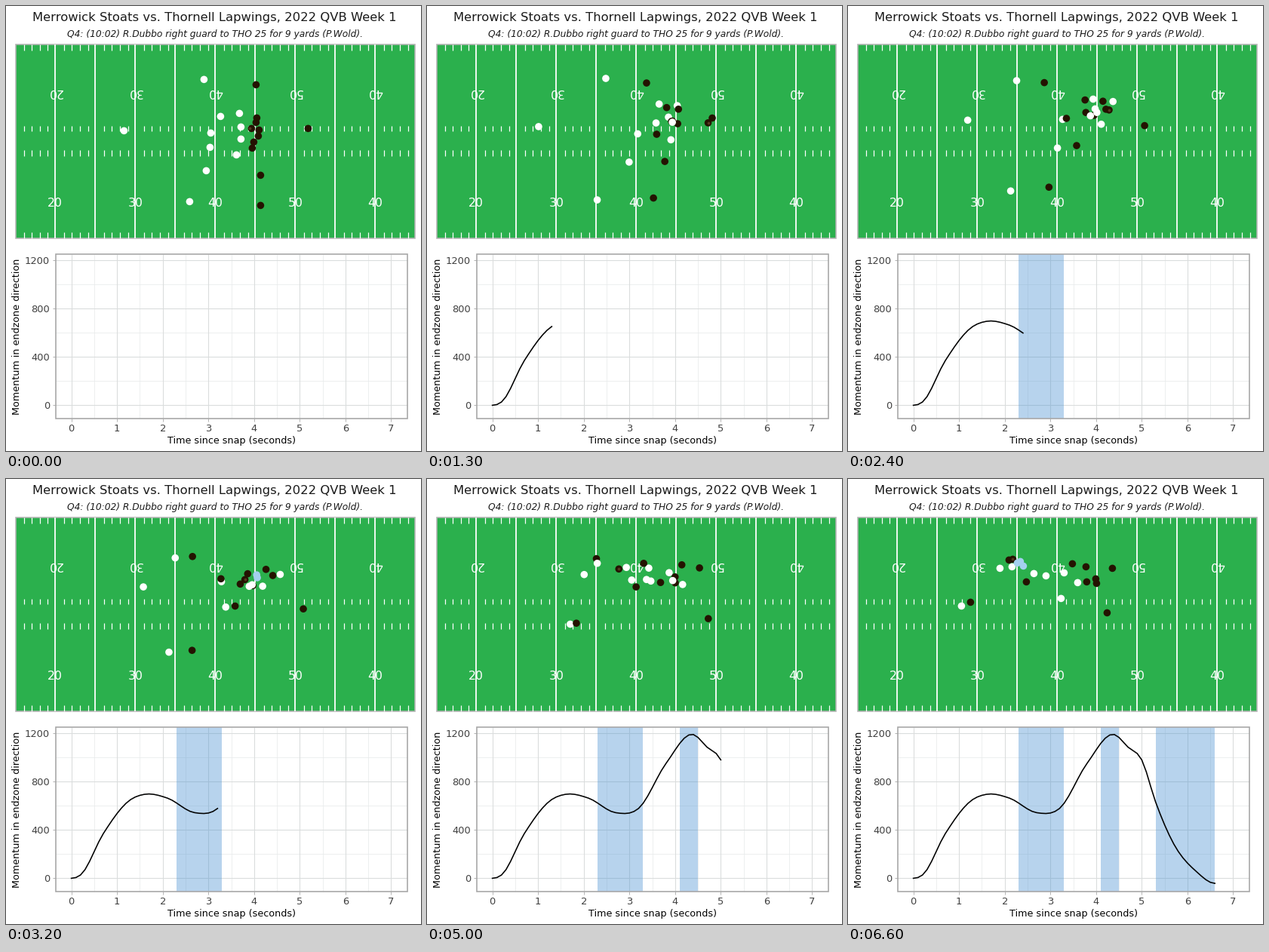
Animation of 550 by 590 pixels, one loop 7200 ms. Source, as a matplotlib script:

```python
import numpy as np
import matplotlib.pyplot as plt
from matplotlib.animation import FuncAnimation
from matplotlib.patches import Rectangle

W, H, DPI = 550, 590, 100
PX = 72 / DPI                      # one pixel in points
FRAMES, LAST, STEP = 72, 66, 100   # the last pose holds until the loop ends

GREEN, DARK, WHITE, TOUCH, BALL = "#2bb04d", "#241300", "#ffffff", "#a3d0ee", "#553720"
CONTACTS = [(2.3, 3.3), (4.1, 4.5), (5.3, 6.6)]
REACH = 18                         # pixels at which a tackler touches the runner
EPS = 0.01

plt.rcParams["font.family"] = "DejaVu Sans"
fig = plt.figure(figsize=(W / DPI, H / DPI), dpi=DPI, facecolor="white")
ax = fig.add_axes([0, 0, 1, 1])
ax.set_xlim(0, W)
ax.set_ylim(H, 0)
ax.axis("off")


def label(x, y, s, size, color="black", ha="center", angle=0, style="normal"):
    ax.text(x, y, s, fontsize=size * PX, color=color, ha=ha, va="baseline",
            rotation=angle, rotation_mode="anchor", style=style, zorder=4)


def vlines(xs, y0, y1, color, width, z=2):
    ax.vlines(xs, y0, y1, colors=color, linewidth=width * PX, zorder=z)


def hlines(ys, x0, x1, color, width, z=2):
    ax.hlines(ys, x0, x1, colors=color, linewidth=width * PX, zorder=z)


def box(x0, y0, x1, y1, z, **style):
    return ax.add_patch(Rectangle((x0, y0), x1 - x0, y1 - y0, zorder=z, **style))


def spline(keys, points):
    """Smooth path through the points, at rest at both ends."""
    keys, points = np.array(keys, float), np.array(points, float)
    span = np.diff(keys).reshape((-1,) + (1,) * (points.ndim - 1))
    slope = np.diff(points, axis=0) / span
    speed = np.zeros_like(points)
    speed[1:-1] = ((slope[:-1] * span[1:] + slope[1:] * span[:-1])
                   / (span[1:] + span[:-1]))

    def at(t):
        i = min(np.searchsorted(keys, t, side="right") - 1, len(keys) - 2)
        h = keys[i + 1] - keys[i]
        u = (t - keys[i]) / h
        ease = u * u * (3 - 2 * u)
        return ((1 - ease) * points[i] + ease * points[i + 1]
                + h * u * (1 - u) * ((1 - u) * speed[i] - u * speed[i + 1]))
    return at


# ---- headings ----
label(276.5, 20, "Merrowick Stoats vs. Thornell Lapwings, 2022 QVB Week 1", 16.4, "#1a1a1a")
label(277, 41.2, "Q4: (10:02) R.Dubbo right guard to THO 25 for 9 yards (P.Wold).",
      12.3, "#1a1a1a", style="italic")

# ---- field ----
LEFT, RIGHT, TOP, BOTTOM = 12.5, 541.5, 51, 307.5
box(LEFT, TOP, RIGHT, BOTTOM, 1, fc=GREEN, ec="#b3b3b3", lw=1.6 * PX)
yard_lines = 65.3 + 53 * np.arange(9)
vlines(yard_lines, TOP, BOTTOM, "white", 1.8)
yards = np.array([66.1 + 10.6 * k for k in range(-4, 45) if k % 5])
for y in (TOP, 158.7, 191, BOTTOM - 7.7):
    vlines(yards, y, y + 7.7, "white", 1.2)
for x, s in zip(yard_lines[::2], ("20", "30", "40", "50", "40")):
    label(x, 265.8, s, 15.7, "white")
    label(x, 109.7, s, 15.7, "white", angle=180)

# ---- chart ----
X0, X1, Y0, Y1 = 65.5, 532, 328.5, 546.5


def chart_x(t):
    return 86.6 + 60.55 * np.asarray(t)


def chart_y(v):
    return 529.4 - 0.1602 * np.asarray(v)


secs, marks = np.arange(8), np.arange(0, 1201, 400)
vlines(chart_x(secs[:-1] + 0.5), Y0, Y1, "#e9ebec", 0.8, 1)
hlines(chart_y(marks[:-1] + 200), X0, X1, "#e9ebec", 0.8, 1)
vlines(chart_x(secs), Y0, Y1, "#dadddd", 1.1, 1)
hlines(chart_y(marks), X0, X1, "#dadddd", 1.1, 1)
vlines(chart_x(secs), Y1, Y1 + 4, "#b3b3b3", 1)
hlines(chart_y(marks), X0 - 4, X0, "#b3b3b3", 1)
box(X0, Y0, X1, Y1, 4, fill=False, ec="#a6a6a6", lw=1.6 * PX)
for s in secs:
    label(chart_x(s), 563.7, str(s), 13, "#404040")
for m in marks:
    label(58, chart_y(m) + 4.8, str(m), 13, "#404040", ha="right")
label(298.5, 580.3, "Time since snap (seconds)", 12.8)
label(17.6, 438, "Momentum in endzone direction", 12.8, angle=90)

bands = [box(chart_x(a), Y0, chart_x(b), Y1, 2, fc="#4d93d2", alpha=0.4, lw=0)
         for a, b in CONTACTS]

momentum = spline(
    [0, 0.2, 0.7, 1.3, 1.6, 2.1, 2.7, 3.2, 3.8, 4.4, 4.7, 5.0, 5.3, 5.7, 6.2, 6.6],
    [0, 27, 370, 652, 695, 664, 543, 578, 950, 1190, 1085, 980, 634, 284, 54, -42])
times = np.arange(LAST + 1) / 10
curve_x, curve_y = chart_x(times), chart_y([momentum(t) for t in times])
curve, = ax.plot([], [], color="black", lw=1.6 * PX, zorder=3)

# ---- players: role, then the spots passed at the key times ----
KEYS = [0, 1.8, 4.2, 6.6]
BACK = [
    ("tackler", (270, 187), (282, 160), (280, 122), (232, 115)),
    ("defence", (265, 218), (270, 199), (295, 148), (217, 116)),
    ("tackler", (311, 160), (323, 141), (326, 124), (228, 109)),
    ("tackler", (156, 165), (148, 156), (205, 133), (201, 118)),
    ("defence", (243, 259), (218, 253), (210, 209), (150, 168)),
    ("defence", (309, 142), (341, 128), (364, 130), (282, 158)),
]
OFFENCE = [
    ("offence", (331, 104), (273, 101), (234, 104), (213, 107)),
    ("offence", (332, 148), (334, 131), (347, 114), (315, 116)),
    ("offence", (331, 154), (313, 127), (327, 128), (328, 132)),
    ("offence", (325, 162), (325, 148), (328, 138), (329, 138)),
    ("offence", (334, 172), (319, 145), (307, 138), (316, 136)),
    ("offence", (328, 180), (335, 145), (363, 120), (350, 118)),
    ("offence", (326, 188), (295, 160), (283, 116), (297, 112)),
    ("offence", (337, 224), (306, 196), (298, 151), (236, 136)),
    ("offence", (337, 264), (282, 248), (222, 209), (162, 163)),
    ("passer", (335, 164), (386, 153), (387, 185), (343, 177)),
    ("runner", (400, 162), (364, 142), (281, 127), (218, 106)),
]
FRONT = [
    ("tackler", (284, 146), (317, 124), (334, 132), (304, 137)),
    ("defence", (271, 168), (315, 149), (313, 138), (246, 125)),
    ("defence", (311, 176), (329, 145), (315, 139), (262, 128)),
    ("defence", (305, 197), (330, 167), (337, 128), (286, 124)),
    ("tackler", (262, 97), (227, 96), (226, 110), (224, 111)),
]
players = BACK + OFFENCE + FRONT
roles = [p[0] for p in players]
PASSER, RUNNER = roles.index("passer"), roles.index("runner")
SNAP = np.array([323, 162])
# half a pixel to the centre of each spot
positions = spline(KEYS, np.swapaxes([p[1:] for p in players], 0, 1) + 0.4)


def shades(t, spots):
    contact = any(a - EPS <= t <= b + EPS for a, b in CONTACTS)
    near = np.hypot(*(spots - spots[RUNNER]).T) < REACH
    colors = {"defence": WHITE, "tackler": WHITE}
    return [TOUCH if contact and close and role == "tackler" else colors.get(role, DARK)
            for role, close in zip(roles, near)]


def ball_at(t, spots):
    snapped = np.interp(t, [0, 0.2], [0, 1])
    handed = np.interp(t, [1.3, 1.5], [0, 1])
    held = spots[PASSER] * (1 - handed) + spots[RUNNER] * handed
    return SNAP * (1 - snapped) + held * snapped


def dots(count, diameter, z):
    return ax.scatter(np.zeros(count), np.zeros(count), s=(diameter * PX) ** 2,
                      linewidths=0, zorder=z)


people, ball = dots(len(players), 9.6, 5), dots(1, 3.8, 6)
ball.set_facecolor(BALL)


def draw(i):
    n = min(i, LAST)
    t = n / 10
    spots = positions(t)
    people.set_offsets(spots)
    people.set_facecolor(shades(t, spots))
    ball.set_offsets([ball_at(t, spots)])
    curve.set_data(curve_x[:n + 1], curve_y[:n + 1])
    for band, (start, _) in zip(bands, CONTACTS):
        band.set_visible(t >= start - EPS)
    return [people, ball, curve, *bands]


anim = FuncAnimation(fig, draw, frames=FRAMES, interval=STEP, repeat=True, repeat_delay=0)
plt.show()
```
